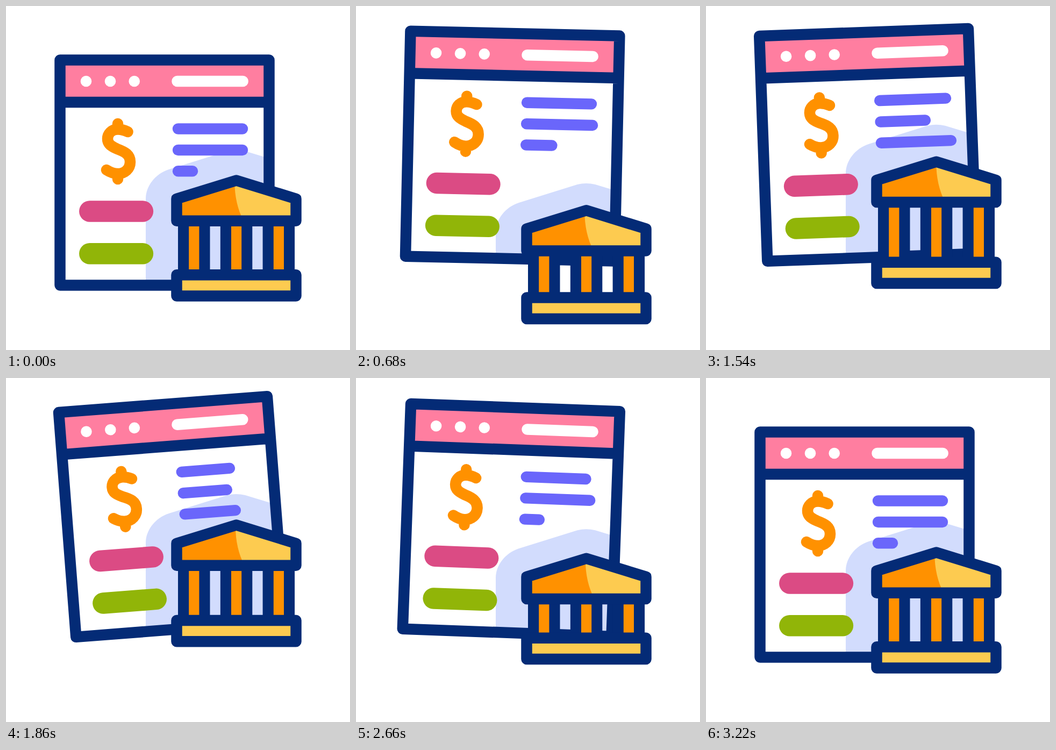
An HTML page without scripts for the animation above (3600 ms loop, 640 by 640 pixels).

```html
<!DOCTYPE html>
<html lang="en">
<head>
<meta charset="utf-8">
<title>Online banking</title>
<style>
  html, body { margin: 0; width: 100%; height: 100%; overflow: hidden; background: #fff; }
  svg { display: block; width: 100vw; height: 100vh; }

  .ink { stroke: #042b76; stroke-width: 20.5; stroke-linejoin: round; }
  .navy { fill: #042b76; }
  .gold { fill: #fdcb50; }
  .amber { fill: #ff9100; }
  .pill { fill: none; stroke-linecap: round; stroke-linejoin: round; }
  .text { stroke: #6a66fb; stroke-width: 20.4; }

  .window, .shadow, .roof, .base, .shine, .text, .dollar {
    animation: 3.6s cubic-bezier(.333, 0, .667, 1) infinite;
  }
  .window { transform-origin: 295px 140px; animation-name: lift, tilt; }
  .shadow { animation-name: shadow; }
  .roof { animation-name: roof; }
  .base { animation-name: base; }
  .shine { animation-name: shine; }
  .dollar { stroke: #ff9100; stroke-width: 20.5; animation-name: tint; }
  .t1 { stroke-dasharray: 120px 400px; animation-name: t1; }
  .t2 { stroke-dasharray: 120px 400px; animation-name: t2; }
  .t3 { stroke-dasharray: 27px 400px; animation-name: t3; }

  @keyframes lift {
    0%, 6.2% { translate: 0 0; }
    20.7%, 70.75% { translate: 0 -51.5px; }
    85.55%, 100% { translate: 0 0; }
  }
  @keyframes tilt {
    0%, 12.8% { rotate: 0deg; }
    31.2% { rotate: 5deg; }
    49.3% { rotate: -5deg; }
    65.6% { rotate: 5deg; }
    80.6%, 100% { rotate: 0deg; }
  }
  @keyframes base {
    0%, 6.2% { translate: 0 0; }
    21.1%, 21.4% { translate: 0 45px; }
    54.6%, 57.1% { translate: 0 -51.3px; }
    84.2%, 100% { translate: 0 0; }
  }
  @keyframes roof {
    0%, 6.2% { translate: 0 0; }
    20.6%, 28.2% { translate: 0 58px; }
    47.5%, 55.8% { translate: 0 -51px; }
    76.5% { translate: 0 14px; }
    89.4%, 100% { translate: 0 0; }
  }
  @keyframes shadow {
    0%, 6.2% { translate: 0 0; }
    20.6%, 27.6% { translate: 0 64.5px; }
    44.9%, 54.5% { translate: 0 -52px; }
    76% { translate: 0 15px; }
    89.4%, 100% { translate: 0 0; }
  }
  @keyframes shine {
    0%, 19% { translate: 0 0; }
    32.8% { translate: 4.5px 0; }
    42.8% { translate: 3px 0; }
    60% { translate: .5px 0; }
    74% { translate: 1.5px 0; }
    86%, 100% { translate: 0 0; }
  }
  @keyframes tint {
    0%, 25% { stroke: #ff9100; }
    29%, 34% { stroke: #67cdd2; }
    39%, 100% { stroke: #ff9100; }
  }
  @keyframes t1 {
    0%, 18.9% { stroke-dasharray: 120px 400px; }
    34.7% { stroke-dasharray: 138px 400px; }
    62.5% { stroke-dasharray: 65px 400px; }
    77.9%, 100% { stroke-dasharray: 120px 400px; }
  }
  @keyframes t2 {
    0%, 15.6% { stroke-dasharray: 120px 400px; }
    28%, 30.6% { stroke-dasharray: 137px 400px; }
    45.6%, 47.2% { stroke-dasharray: 78px 400px; }
    73.3%, 100% { stroke-dasharray: 120px 400px; }
  }
  @keyframes t3 {
    0%, 9.25% { stroke-dasharray: 27px 400px; }
    42.4%, 44.4% { stroke-dasharray: 130px 400px; }
    62.8%, 100% { stroke-dasharray: 27px 400px; }
  }
</style>
</head>
<body>
<svg viewBox="0 0 640 640">
  <defs>
    <path id="gable" d="M317.5 358.7L428.5 324.5L539.5 358.7V399.8H317.5Z"/>
    <clipPath id="gableClip"><use href="#gable"/></clipPath>
    <g id="pillar">
      <path class="navy" d="M0 385h59.5v115h-59.5z"/>
      <path class="amber" d="M20.2 385h19.2v115h-19.2z"/>
    </g>
  </defs>

  <path class="shadow" fill="#d2dcfd"
    d="M260 800V358C260 335 278 312 303 304L412 270Q428 266 445 270L560 305V800Z"/>

  <g class="window">
    <!-- white surround hides the shadow outside the window -->
    <path fill="#fff" fill-rule="evenodd" d="M-600-600H1240V1240H-600ZM100.5 100.5V519.5H489.5V100.5Z"/>
    <path fill="#ff7ea0" d="M100.5 100.5H489.5V179H100.5Z"/>
    <path class="ink" fill="none" d="M100.5 100.5H489.5V519.5H100.5ZM100.5 179H489.5"/>
    <g fill="#fff">
      <circle cx="149" cy="140" r="10.3"/>
      <circle cx="194" cy="140" r="10.3"/>
      <circle cx="238.7" cy="140" r="10.3"/>
    </g>
    <path class="pill" stroke="#fff" stroke-width="20.5" d="M318.5 140H440.7"/>
    <path class="pill dollar" d="M226.5 234Q217 229.5 208 229.5C196 229.5 189 238 189 247C189 257 196 261 207 266C222 271.5 231 277 231 290C231 303 221 312 208 312C200 312 194 309.5 187 305M208 219V229.5M208 312V322"/>
    <path class="pill text t1" d="M320 228.5H480"/>
    <path class="pill text t2" d="M320 268H480"/>
    <path class="pill text t3" d="M320 307.3H480"/>
    <path class="pill" stroke="#db4b84" stroke-width="39.5" d="M155.8 382H254.4"/>
    <path class="pill" stroke="#91b508" stroke-width="39.5" d="M155.8 460.7H254.4"/>
  </g>

  <g class="base">
    <use href="#pillar" x="320"/>
    <use href="#pillar" x="398.8"/>
    <use href="#pillar" x="477.6"/>
    <path class="ink gold" d="M317.5 500.2H539.5V539.5H317.5Z"/>
  </g>

  <g class="roof">
    <use href="#gable" class="gold"/>
    <g clip-path="url(#gableClip)">
      <path class="shine amber" d="M300 310H426Q422 361 442 400H300Z"/>
    </g>
    <use href="#gable" class="ink" fill="none"/>
  </g>
</svg>
</body>
</html>
```
